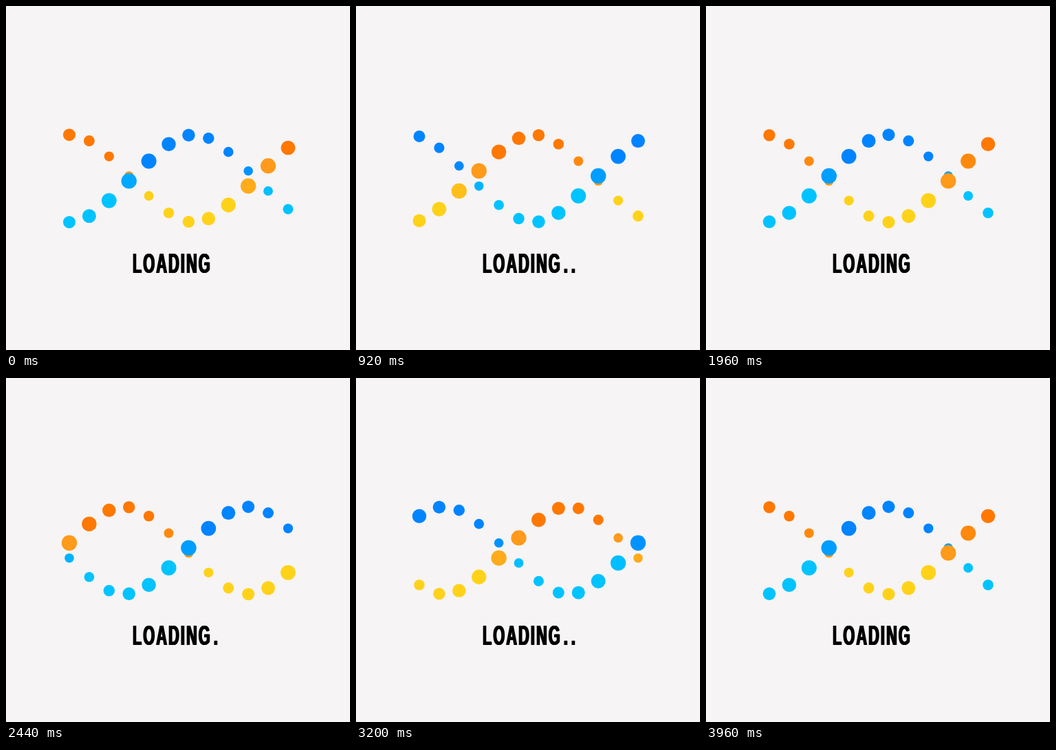
An HTML page that plays this animation: 500 by 500 pixels, repeating every 4000 ms.

```html
<!DOCTYPE html>
<html lang="en">
<head>
<meta charset="utf-8">
<title>Loading</title>
<style>
  html, body { margin: 0; width: 100%; height: 100%; overflow: hidden; background: #f6f4f5; }
  svg { position: absolute; left: 0; top: 0; display: block; }
  p {
    position: absolute; left: 184.4px; top: 354px; margin: 0;
    font: bold 40px/40px "Liberation Sans", Arial, sans-serif;
    font-kerning: none; letter-spacing: 4px; white-space: nowrap; color: #000;
    text-shadow: 1.6px 0 #000, -1.6px 0 #000;
    transform: scaleX(.541); transform-origin: 0 0;
  }
  #dots { margin-left: 5.5px; letter-spacing: 9.2px; }
</style>
</head>
<body>
<svg id="helix" width="500" height="500" viewBox="0 0 500 500"></svg>
<p>LOADING<span id="dots"></span></p>
<script>
const PERIOD = 2000, STEP = 40, DELAY = 160, COLUMNS = 12;
const MID_Y = 250.7, SWING = 63.5, RADIUS = 9, GROWTH = 2.25;
const TAU = 2 * Math.PI;

// Colour stops by height: 1 is the top of the swing, -1 the bottom.
const WARM = [
  [.5, [255, 120, 0]],
  [.29, [255, 154, 26]],
  [-.07, [255, 154, 26]],
  [-.41, [255, 210, 26]]
];
const COOL = [
  [.34, [0, 132, 255]],
  [-.34, [0, 195, 255]]
];

const helix = document.getElementById('helix');
const dots = document.getElementById('dots');

function addCircle(x) {
  const c = document.createElementNS('http://www.w3.org/2000/svg', 'circle');
  c.setAttribute('cx', x);
  return helix.appendChild(c);
}

const columns = Array.from({ length: COLUMNS }, (_, i) => {
  const x = 92 + i * 318 / (COLUMNS - 1);
  return { back: addCircle(x), front: addCircle(x) };
});

// Cosine with slightly sharper peaks.
const wave = a => .98 * Math.cos(a) + .02 * Math.cos(3 * a);

function colorAt(stops, h) {
  let i = 0;
  while (i < stops.length - 2 && h < stops[i + 1][0]) i++;
  const [h0, c0] = stops[i], [h1, c1] = stops[i + 1];
  const k = Math.min(1, Math.max(0, (h0 - h) / (h0 - h1)));
  return `rgb(${c0.map((v, j) => Math.round(v + (c1[j] - v) * k))})`;
}

function place(circle, angle, stops) {
  const h = wave(angle);
  circle.setAttribute('cy', MID_Y - SWING * h);
  circle.setAttribute('r', RADIUS + GROWTH * wave(angle + TAU / 4));
  circle.setAttribute('fill', colorAt(stops, h));
}

function draw(t) {
  columns.forEach(({ back, front }, i) => {
    const angle = TAU * (i * DELAY - t) / PERIOD;
    const warmNear = Math.sin(angle) < 0;
    place(warmNear ? front : back, angle, WARM);
    place(warmNear ? back : front, angle + Math.PI, COOL);
  });
  const text = '.'.repeat(Math.floor(t / PERIOD * 4 + .5) % 4);
  if (dots.textContent !== text) dots.textContent = text;
}

let start;
function tick(now) {
  start ??= now;
  draw(Math.floor((now - start + .5) / STEP) * STEP % PERIOD);
  requestAnimationFrame(tick);
}
draw(0);
requestAnimationFrame(tick);
</script>
</body>
</html>
```
